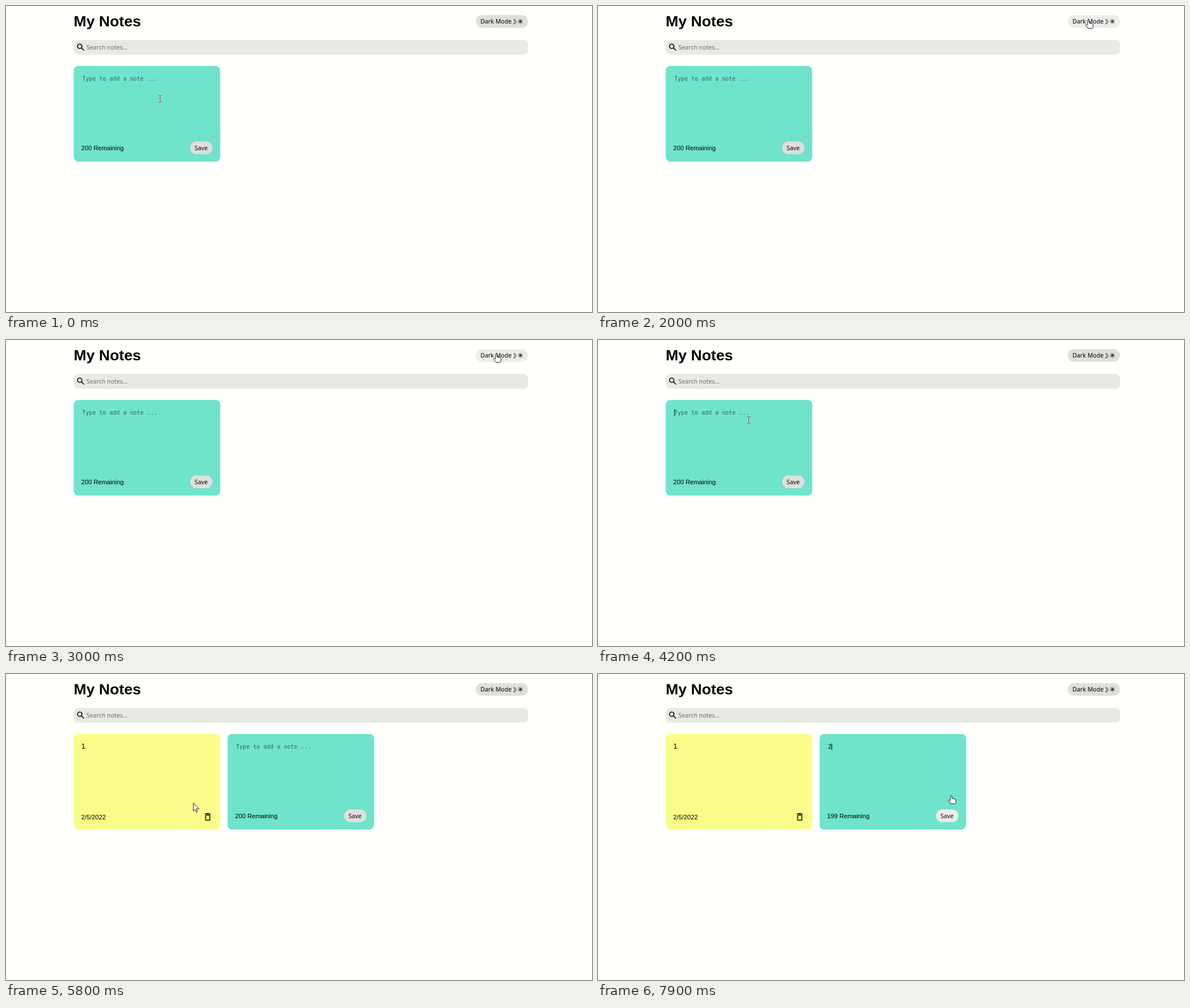
An HTML page for the animation above (8000 ms loop, 1034x541 px).

```html
<!DOCTYPE html>
<html lang="en">
<head>
<meta charset="utf-8">
<title>My Notes</title>
<style>
  html, body { margin: 0; width: 100%; height: 100%; overflow: hidden; background: #fffffc; }
  svg { display: block; width: 1034px; height: 541px; }
  text { font: 11.13px "Liberation Sans", Arial, sans-serif; white-space: pre; }
  .title { font-size: 26.7px; font-weight: bold; }
  .ui { font: 10.6px "Noto Sans", "Open Sans", sans-serif; }
  .mono { font: 10px "DejaVu Sans Mono", monospace; }
  .note { font-size: 13.36px; }
  .hint { fill-opacity: .54; }
  .button { fill: #dfdfdd; }
  .button.lit { fill: #ececea; }
  .dark { background: #000; }
  .dark .title { fill: #fffffc; }
  .arrow, .hand { fill: #fff; stroke: #222; stroke-linejoin: round; }
  .ibeam { fill: none; stroke: #222; }
  .halo { stroke: #fff; stroke-width: 2.6; stroke-opacity: .8; }
</style>
</head>
<body>
<svg id="page" viewBox="0 0 1034 541">
  <text class="title" x="119.5" y="36">My Notes</text>

  <rect id="modeButton" class="button" x="829" y="16" width="92" height="22.5" rx="11.2"/>
  <text class="ui" x="837.2" y="31">Dark Mode</text>
  <path d="M895.5 24c6-.8 6 8.4 0 7.6c3-1.6 3-6 0-7.6z" fill="none" stroke="#000" stroke-width=".7"/>
  <circle cx="907.7" cy="27.3" r="2"/>
  <circle cx="907.7" cy="27.3" r="3.6" fill="none" stroke="#000" stroke-width="1.4"
          stroke-dasharray="1 1.827" stroke-dashoffset=".5"/>

  <rect x="119.5" y="60" width="801.5" height="26" rx="8" fill="#e8e8e4"/>
  <g transform="translate(123.3 64.3) scale(.72)" fill="none" stroke="#000" stroke-width="2.1">
    <circle cx="9.5" cy="9.5" r="5.5"/>
    <path d="M13.6 13.6l6.2 6.2"/>
  </g>
  <text class="ui hint" x="142" y="77">Search notes...</text>

  <g id="savedNote">
    <rect x="119.5" y="106" width="258.5" height="169" rx="8" fill="#fafc8a"/>
    <text class="note" x="132.8" y="132">1</text>
    <text x="132.8" y="256.5">2/5/2022</text>
    <path transform="translate(347.2 243.8) scale(.73)" fill-rule="evenodd"
          d="M8 9v10h8V9zM9.5 3h5l1 1H19v2H5V4h3.5zM6 7h12v12q0 2-2 2H8q-2 0-2-2z"/>
  </g>

  <g id="editor">
    <rect x="119.5" y="106" width="258.5" height="169" rx="8" fill="#6fe4ca"/>
    <text id="draft" class="mono" x="134.4" y="132"></text>
    <rect id="caret" y="122.5" width="1" height="12"/>
    <text id="counter" x="132.8" y="255"></text>
    <rect id="saveButton" class="button" x="325" y="239.5" width="39.3" height="22.5" rx="11.2"/>
    <text class="ui" x="332.8" y="255">Save</text>
  </g>

  <g id="pointer">
    <path class="arrow" d="M0 0V14l3.3-3 2 5 2-.9-2-4.8H10z"/>
    <g class="ibeam">
      <path class="halo" d="M-3-6.5h2l1 1 1-1h2M0-5.5v11M-3 6.5h2l1-1 1 1h2"/>
      <path d="M-3-6.5h2l1 1 1-1h2M0-5.5v11M-3 6.5h2l1-1 1 1h2"/>
    </g>
    <path class="hand" d="M-3.2-6.6q1.4-1.4 2.7 0V-2l5 1q2 .5 2 2V4q0 2-1.3 3.5H-2.5L-6.5 1.6q.5-1.7 2-.7L-3.2 2z"/>
  </g>
</svg>
<script>
const LOOP = 8000, STEP = 100;
const $ = id => document.getElementById(id);

// Pointer path: time, x, y and the shape it takes from then on.
const path = [
  [0, 272, 164, 'ibeam'], [1200, 272, 164, 'ibeam'], [1400, 315, 172, 'ibeam'],
  [1500, 410, 150, 'arrow'], [1800, 800, 50, 'arrow'], [1900, 855, 34, 'hand'],
  [2000, 867, 32, 'hand'], [3100, 867, 32, 'hand'], [3200, 800, 46, 'arrow'],
  [3400, 480, 112, 'arrow'], [3500, 330, 136, 'ibeam'], [3600, 266, 142, 'ibeam'],
  [4300, 266, 142, 'ibeam'], [4700, 270, 185, 'ibeam'], [4900, 300, 238, 'arrow'],
  [5100, 338, 276, 'arrow'], [5200, 346, 262, 'hand'], [5300, 348, 258, 'hand'],
  [5600, 348, 258, 'hand'], [5700, 338, 240, 'arrow'], [6100, 308, 193, 'arrow'],
  [6200, 308, 193, 'arrow'], [6500, 415, 188, 'ibeam'], [6900, 589, 174, 'ibeam'],
  [7100, 589, 174, 'ibeam'], [7300, 609, 164, 'ibeam'], [7700, 609, 164, 'ibeam'],
  [7800, 619, 194, 'ibeam'], [7900, 625, 222, 'hand'], [LOOP, 625, 222, 'hand']
];

const within = (t, from, to) => t >= from && t < to;
const show = (node, on) => node.style.display = on ? '' : 'none';

function drawPointer(t) {
  const i = path.findIndex(point => point[0] > t);
  const [t0, x0, y0, shape] = path[i - 1], [t1, x1, y1] = path[i];
  const k = (t - t0) / (t1 - t0);
  $('pointer').setAttribute('transform', `translate(${x0 + (x1 - x0) * k} ${y0 + (y1 - y0) * k})`);
  for (const node of $('pointer').children) show(node, node.classList.contains(shape));
}

function draw(t) {
  const dark = within(t, 2300, 3000);
  $('page').classList.toggle('dark', dark);
  $('modeButton').classList.toggle('lit', within(t, 1900, 3200));
  $('saveButton').classList.toggle('lit', within(t, 5200, 5600) || t >= 7800);

  const saved = t >= 5600;
  show($('savedNote'), saved);
  $('editor').setAttribute('transform', `translate(${saved ? 271.5 : 0} 0)`);

  const typed = within(t, 4400, 5600) ? '1' : t >= 7700 ? '2' : '';
  $('draft').textContent = typed || 'Type to add a note ...';
  $('draft').classList.toggle('hint', !typed);
  $('counter').textContent = `${200 - typed.length} Remaining`;
  $('caret').setAttribute('x', 134.5 + 6.02 * typed.length);
  show($('caret'), within(t, 3900, 4900) || t >= 7500);

  drawPointer(t);
}

function tick(now) {
  draw(Math.floor(now % LOOP / STEP) * STEP);
  requestAnimationFrame(tick);
}
draw(0);
requestAnimationFrame(tick);
</script>
</body>
</html>
```
